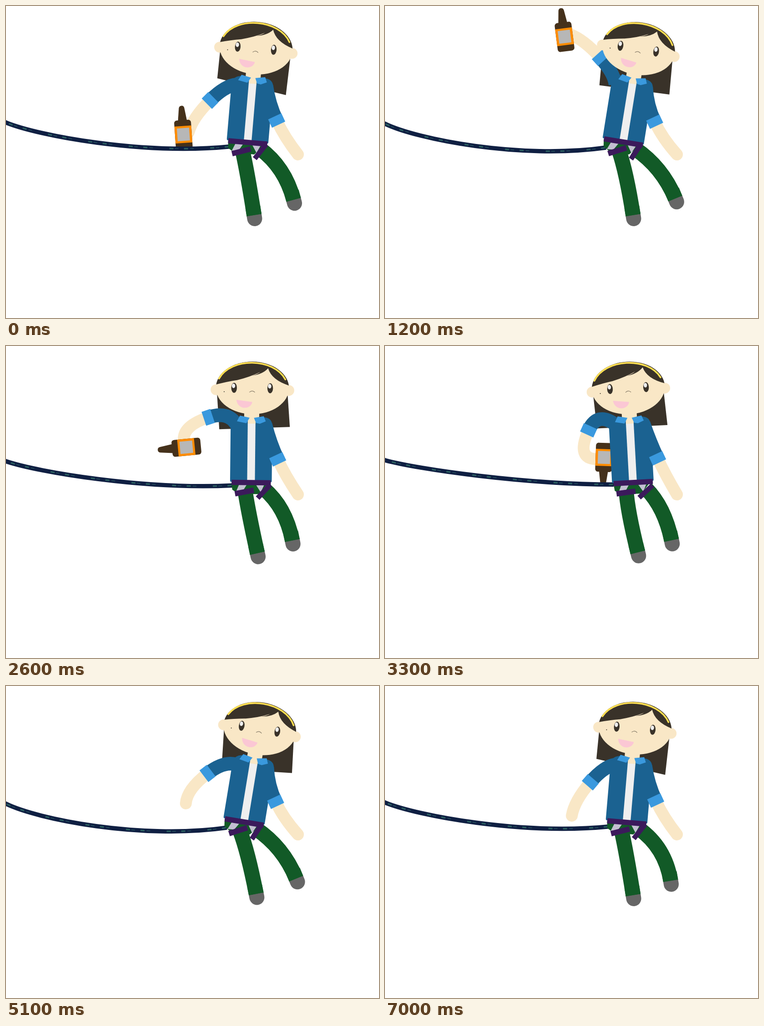
Recreate the animation shown at these times as an HTML page with a canvas. Size 819 by 683 pixels, loop 7.1 s.

```html
<!DOCTYPE html>
<html lang="en">
<head>
<meta charset="utf-8">
<title>Swinging climber</title>
<style>
html, body { margin: 0; width: 100%; height: 100%; overflow: hidden; background: #fff; }
canvas { display: block; }
</style>
</head>
<body>
<canvas id="stage" width="819" height="683"></canvas>
<script>
const ctx = document.getElementById('stage').getContext('2d');
const LOOP = 7100, STEP = 100, BOTTLE_GONE = 3.7;
const PIVOT = [539, 198], SHOULDER = [506, 172];
const SKIN = '#f9e7c6', HAIR = '#393229', JACKET = '#1b6291', CUFF = '#3a99de',
      GREEN = '#125a27', SHOE = '#666', PURPLE = '#3b1a5b', LILAC = '#c3bfd1',
      ROPE = '#0f1f42', BROWN = '#45311b';

// Turning points: [seconds, value]
const SWING = [[0, 4.9], [1.7, 10.3], [3.1, -3.4], [4.3, 2.4], [5.4, 10.5], [7, 4.9]];
const HAIR_TILT = [[0, 13.7], [1.9, 2.6], [3, -3], [5.1, 3.5], [7, 13]];
const RIGHT_FOOT = [[0, 633.5], [1.1, 640.5], [2.8, 629.8], [5.6, 641], [7, 628.5]];
const ARM_RAISE = [[0, 149], [.7, 205], [1.5, 250], [1.9, 225], [3.3, 168], [3.7, 166], [4.3, 180], [5.1, 163], [7, 145]];
const ELBOW = [[0, -25], [1.9, -31], [3.3, -97], [3.7, -115], [4.3, -71], [5.1, -37], [7, -26]];

const rad = deg => deg * Math.PI / 180;
const along = ([x, y], deg, d) => [x + Math.cos(rad(deg)) * d, y + Math.sin(rad(deg)) * d];
const hump = (t, mid, half) => Math.abs(t - mid) < half ? Math.cos((t - mid) / half * Math.PI / 2) ** 2 : 0;
function ease(t, from, to) {
  const u = Math.min(Math.max((t - from) / (to - from), 0), 1);
  return u * u * (3 - 2 * u);
}

// Smooth curve through turning points, at rest at both ends and at each extreme
function track(keys, t) {
  const next = keys.findIndex(k => k[0] > t);
  if (next < 0) return keys.at(-1)[1];
  const slope = n => {
    const p = keys[n - 1], k = keys[n], q = keys[n + 1];
    if (!p || !q || (k[1] - p[1]) * (q[1] - k[1]) <= 0) return 0;
    return (q[1] - p[1]) / (q[0] - p[0]);
  };
  const [t0, v0] = keys[next - 1], [t1, v1] = keys[next];
  const span = t1 - t0, u = (t - t0) / span;
  return v0 + (v1 - v0) * u * u * (3 - 2 * u)
    + span * u * (1 - u) * (slope(next - 1) * (1 - u) - slope(next) * u);
}

function swung([x, y], deg) {
  const c = Math.cos(rad(deg)), s = Math.sin(rad(deg)), dx = x - PIVOT[0], dy = y - PIVOT[1];
  return [PIVOT[0] + dx * c - dy * s, PIVOT[1] + dx * s + dy * c];
}

function fill(path, color) {
  ctx.fillStyle = color;
  ctx.fill(typeof path === 'string' ? new Path2D(path) : path);
}

function oval(x, y, rx, ry, color) {
  const p = new Path2D();
  p.ellipse(x, y, rx, ry, 0, 0, 7);
  fill(p, color);
  return p;
}

function stroke(path, color, width, cap = 'butt') {
  ctx.strokeStyle = color;
  ctx.lineWidth = width;
  ctx.lineCap = cap;
  ctx.stroke(new Path2D(path));
}

const quad = (from, bend, to) => `M${from} Q${bend} ${to}`;

function bar([x, y], deg, length, height, color) {
  ctx.save();
  ctx.translate(x, y);
  ctx.rotate(rad(deg));
  ctx.fillStyle = color;
  ctx.fillRect(-length / 2, -height / 2, length, height);
  ctx.restore();
}

function arm(shoulder, cuff, heading, hand, upperBend, lowerBend) {
  stroke(quad(cuff, along(cuff, heading, lowerBend), hand), SKIN, 26, 'round');
  stroke(quad(shoulder, along(cuff, heading, -upperBend), cuff), JACKET, 30);
  bar(cuff, heading, 20, 32, CUFF);
}

function leg(hip, foot, heading, bend) {
  const ankle = along(foot, heading, -8);
  stroke(`M${ankle} L${foot}`, SHOE, 33, 'round');
  stroke(quad(hip, along(ankle, heading, -bend), ankle), GREEN, 33);
  // square off the shoe where the trouser ends
  bar(along(ankle, heading, -9), heading, 18.5, 33, GREEN);
}

function bottle(hand, deg) {
  ctx.save();
  ctx.translate(...hand);
  ctx.rotate(rad(deg));
  ctx.translate(-12, 4);
  const body = new Path2D();
  body.roundRect(-18.5, -31.5, 37, 63.5, 6);
  fill(body, BROWN);
  fill('M-10 -29 L-6 -58 Q-5 -63 0 -63 Q5 -63 6 -58 L10 -29Z', BROWN);
  bar([0, 0], 0, 37, 37, '#ff8c00');
  bar([0, 0], 0, 27, 28, '#b7b7b7');
  ctx.restore();
}

function drinkingArm(t) {
  const raise = track(ARM_RAISE, t), elbow = track(ELBOW, t), reach = 90 + .24 * elbow;
  const cuff = along(SHOULDER, raise, 70 + .1 * elbow);
  const hand = along(cuff, raise + elbow, reach);
  arm(SHOULDER, cuff, raise + .55 * elbow, hand, 46, 138 - reach);
  if (t < BOTTLE_GONE) bottle(hand, -4 - 9 * ease(t, .7, 1.9) - 165 * ease(t, 1.9, 3.3));
}

function rope(a) {
  const end = [498 - 1.4 * a, 305 + .55 * a];
  const path = `M${end} C${end[0] * .612} ${313 + 3 * a - .05 * a * a} ${end[0] * .143} ${275.3 + 1.75 * a} 0 ${252 + .62 * a} l-12 -6`;
  const dashes = (pattern, offset, color, width) => {
    ctx.setLineDash(pattern);
    ctx.lineDashOffset = -offset;
    stroke(path, color, width);
    ctx.setLineDash([]);
  };
  stroke(path, ROPE, 9.5);
  dashes([9, 23, 9, 48.5], 2, '#2b5f60', 3.2);
  dashes([8, 48, 8, 25.5], 23, '#24505c', 1.6);
}

function hips() {
  fill('M496 299 H578 L556 324 H512 L498 315Z', GREEN);
  fill('M513 303 H530 L520.5 319 L506 320Z', LILAC);
  fill('M550 304 H568 L560.5 320Z', LILAC);
}

function torso() {
  fill('M493 172 Q496 156 515 155 L568 156 Q584 158 584.5 174 L584.5 296 Q584 298 582 298 L496 298 Q493 298 493 295Z', JACKET);
  fill('M530.5 158 H547.5 V297 H530.5Z', '#efefef');
  bar([539.5, 299], 0, 86, 11.5, PURPLE);
  fill('M522.5 135 H555.5 V157 L547.5 160 V170 H531 V160 L522.5 157Z', SKIN);
  fill('M513.3 152.5 L534.5 157 L527.5 169 L506.7 165Z', CUFF);
  fill('M544 157.2 L565.5 153.4 L570 164.6 L557 170 L548.7 168.5Z', CUFF);
}

function head() {
  for (const x of [460, 620]) oval(x, 96.5, 11.8, 11.8, SKIN);
  ctx.save();
  ctx.clip(oval(540, 91.7, 80.3, 57.5, SKIN));
  fill('M450 88 Q480 79 506 75 Q534 68 557 56.5 Q550 62 539 65 Q562 62 574 48.5 Q582 75 624 87 V20 H450Z', HAIR);
  ctx.restore();
  stroke('M466.5 72 C492 25 586 25 612 72.5', '#ffe052', 3.6, 'round');
  for (const x of [499.7, 579]) {
    oval(x, 92, 6.2, 11, HAIR);
    oval(x - 1.2, 87.7, 3.7, 5, '#efefef');
  }
  stroke('M533.3 101.3 Q539.5 95.5 545.5 101.3', '#6b6252', 1);
  oval(478, 100.6, 1, 1, HAIR);
  fill('M505 118 L540 122.5 C537 140 508 141 505 118Z', '#fbc7d4');
}

function draw(t) {
  ctx.fillStyle = '#fff';
  ctx.fillRect(0, 0, 819, 683);
  const a = track(SWING, t);
  const inBody = paint => {
    ctx.save();
    ctx.translate(...PIVOT);
    ctx.rotate(rad(a));
    ctx.translate(-PIVOT[0], -PIVOT[1]);
    paint();
    ctx.restore();
  };

  const tilt = track(HAIR_TILT, t);
  const hem = [543.9 + .97 * a - .69 * tilt, 178.4 + .96 * a - .47 * tilt];
  fill(`M${swung([462, 100], a)} L${along(hem, tilt, -77.5)} L${along(hem, tilt, 77.5)} L${swung([617, 100], a)}Z`, HAIR);

  drinkingArm(t);
  rope(a);

  const kick = track(RIGHT_FOOT, t) - 629;
  const lift = 11 * hump(t, 3.2, 1.6) + 8 * hump(t, 5.7, 1.4);
  leg([567 - 2 * a, 312], [629 + kick, 433.8 - .45 * kick], 80 - 1.1 * kick, 74);
  leg([525.5 - 1.3 * a, 316], [546 + lift, 465.5 - .57 * lift], 81 - .45 * lift, 95);
  inBody(hips);
  bar([524.3 - 1.55 * a, 319.7 - .32 * a], -10.2 - .8 * a, 42, 12, PURPLE);
  bar([567.3 - 1.75 * a, 318.5], 134 - 1.1 * a, 40, 11, PURPLE);

  inBody(torso);
  arm(swung([569.5, 172], a), [596.9 - .52 * a, 247.7 + .6 * a], 65, [641, 325], 40, 40);
  inBody(head);
}

function frame() {
  draw(Math.floor(performance.now() % LOOP / STEP) * STEP / 1000);
  requestAnimationFrame(frame);
}
frame();
</script>
</body>
</html>
```
